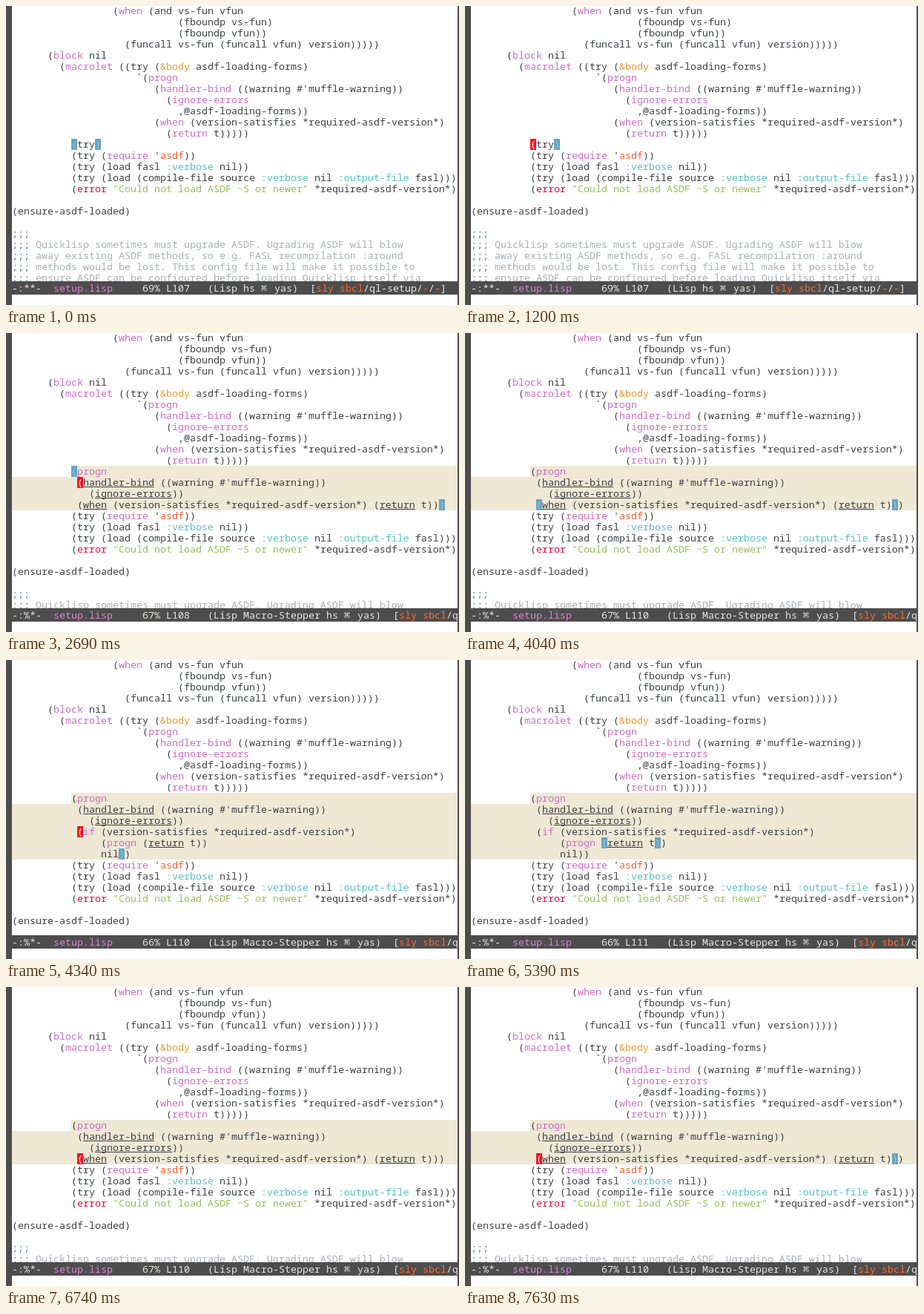
An HTML page for the animation above (8000 ms loop, 611 by 403 pixels).

```html
<!DOCTYPE html>
<html lang="en">
<head>
<meta charset="utf-8">
<title>Macro stepper</title>
<style>
html, body { margin: 0; width: 100%; height: 100%; overflow: hidden; background: #fff; }
#stage {
  position: relative; width: 611px; height: 403px; overflow: hidden; background: #fff;
  font: 13.333px/15px "Noto Sans Mono", "DejaVu Sans Mono", monospace;
  font-variant-ligatures: none; color: #3e4046;
}
#stage div, #stage span.at { position: absolute; white-space: pre; }
#buffer { left: 0; top: 0; width: 611px; height: 371px; overflow: hidden; }
#stage .edge { top: 0; height: 403px; background: #4d4d4d; }
#mode { left: 0; top: 371px; width: 611px; height: 18px; background: #4d4d4d; color: #e8e6e3; overflow: hidden; }
#echo { left: 8px; top: 389px; }
.sel { background: #eee8d5; }
.cell { width: 8px; height: 15px; }
.match { background: #62a7c6; color: #a9c0c6; }
.cursor { background: #f81024; color: #fff; }
.kw { color: #cb6dc4; }
.arg { color: #e59a2f; }
.key { color: #58bfbf; }
.sym { color: #fb5a2a; }
.err { color: #dc0d45; }
.str { color: #98bf5c; }
.rem { color: #abaeb5; }
.semi { color: #5a7898; }
.file { color: #dd82d2; }
.repl { color: #ff6b2c; }
u { text-underline-offset: 1px; text-decoration-thickness: 1px; text-decoration-skip-ink: none; }
</style>
</head>
<body>
<div id="stage">
  <div id="buffer"></div>
  <div id="echo"></div>
  <div id="mode"></div>
  <div class="edge" style="left:0;width:8px"></div>
  <div class="edge" style="left:609px;width:2px"></div>
</div>
<script>
const CW = 8, LH = 15, LOOP = 8000, FIRST = 12;
const el = id => document.getElementById(id);
const x = col => 8 + col * CW;
const y = row => row * LH - 1;

// Each line is [column, text].
const head = [
  [17, "(when (and vs-fun vfun"],
  [28, "(fboundp vs-fun)"],
  [28, "(fboundp vfun))"],
  [19, "(funcall vs-fun (funcall vfun) version)))))"],
  [6, "(block nil"],
  [8, "(macrolet ((try (&body asdf-loading-forms)"],
  [21, "`(progn"],
  [24, "(handler-bind ((warning #'muffle-warning))"],
  [26, "(ignore-errors"],
  [28, ",@asdf-loading-forms))"],
  [24, "(when (version-satisfies *required-asdf-version*)"],
  [26, "(return t)))))"]
];
const tail = [
  [10, "(try (require 'asdf))"],
  [10, "(try (load fasl :verbose nil))"],
  [10, "(try (load (compile-file source :verbose nil :output-file fasl)))"],
  [10, "(error \"Could not load ASDF ~S or newer\" *required-asdf-version*)"],
  [0, ""],
  [0, "(ensure-asdf-loaded)"],
  [0, ""],
  [0, ";;;"],
  [0, ";;; Quicklisp sometimes must upgrade ASDF. Ugrading ASDF will blow"],
  [0, ";;; away existing ASDF methods, so e.g. FASL recompilation :around"],
  [0, ";;; methods would be lost. This config file will make it possible to"],
  [0, ";;; ensure ASDF can be configured before loading Quicklisp itself via"]
];
const stepTop = [
  [10, "(progn"],
  [11, "(<u>handler-bind</u> ((warning #'muffle-warning))"],
  [13, "(<u>ignore-errors</u>))"]
];
const ifForm = body => [
  ...stepTop,
  [11, "(if (version-satisfies *required-asdf-version*)"],
  [15, `(progn ${body})`],
  [15, "nil))"]
];
const views = {
  plain: { pct: 69, lines: [[10, "(try)"]] },
  when: { pct: 67, lines: [...stepTop,
    [11, "(<u>when</u> (version-satisfies *required-asdf-version*) (<u>return</u> t)))"]] },
  if: { pct: 66, lines: ifForm("(<u>return</u> t)") },
  from: { pct: 66, lines: ifForm("(return-from nil t)") }
};

// Row and column of the opening and the closing paren of each form.
const forms = {
  try: [12, 10, 12, 14],
  progn: [12, 10, 15, 72],
  bind: [13, 11, 14, 28],
  ignore: [14, 13, 14, 27],
  when: [15, 11, 15, 71],
  if: [15, 11, 17, 18],
  return: [16, 22, 16, 31],
  from: [16, 22, 16, 40]
};

// [start ms, view, form at the cursor, cursor lit, form with marked parens]
const steps = [
  [0, "plain", "try", 0, "try"],
  [150, "plain", "try", 1, "try"],
  [600, "plain", "try", 0, "try"],
  [1200, "plain", "try", 1, "try"],
  [1650, "when", "progn", 1, ""],
  [1800, "when", "progn", 1, "progn"],
  [2240, "when", "progn", 0, "progn"],
  [2690, "when", "bind", 1, "progn"],
  [2840, "when", "bind", 1, "bind"],
  [2990, "when", "ignore", 1, "bind"],
  [3140, "when", "ignore", 1, "ignore"],
  [3440, "when", "when", 1, "ignore"],
  [3590, "when", "when", 1, "when"],
  [4040, "when", "when", 0, "when"],
  [4190, "if", "if", 1, ""],
  [4340, "if", "if", 1, "if"],
  [4790, "if", "if", 0, "if"],
  [4940, "if", "return", 1, "if"],
  [5090, "if", "return", 1, "return"],
  [5390, "if", "return", 0, "return"],
  [5540, "from", "from", 1, ""],
  [5690, "from", "from", 1, "from"],
  [5990, "from", "from", 0, "from"],
  [6290, "if", "return", 1, ""],
  [6440, "if", "return", 1, "return"],
  [6740, "when", "when", 1, ""],
  [6890, "when", "when", 1, "when"],
  [7190, "when", "when", 0, "when"],
  [7630, "when", "when", 1, "when"]
];

const span = (cls, text) => `<span class="${cls}">${text}</span>`;
const syntax = /(?<=\()(?<kw>when|if|block|macrolet|progn|handler-bind|ignore-errors|return-from|return|require)\b|(?<=\()(?<err>error)\b|(?<str>"[^"]*")|(?<key>:[a-z-]+)|(?<arg>&body)|(?<=\s')(?<sym>asdf)/g;

function paint(text) {
  if (text.startsWith(";;;")) return span("semi", ";;;") + span("rem", text.slice(3));
  return text.replace(syntax, (m, ...rest) => {
    const groups = rest[rest.length - 1];
    return span(Object.keys(groups).find(k => groups[k]), m);
  });
}

const line = ([col, text], row) =>
  `<div style="left:${x(col)}px;top:${y(row)}px">${paint(text)}</div>`;
const cell = (row, col, ch, cls) =>
  `<div class="cell ${cls}" style="left:${x(col)}px;top:${y(row)}px">${ch}</div>`;
const band = (left, row, rows) =>
  `<div class="sel" style="left:${left}px;top:${y(row)}px;width:${609 - left}px;height:${rows * LH}px"></div>`;

function modeLine(stepping, pct, num) {
  const at = (left, html) => `<span class="at" style="left:${left}px;top:2px">${html}</span>`;
  const dash = span("repl", "-");
  const minor = stepping ? "Lisp Macro-Stepper" : "Lisp";
  const where = stepping ? "/q" : `/ql-setup/${dash}/${dash}]`;
  return at(x(0), `-:${stepping ? "%" : "*"}*-`) + at(x(7), span("file", "setup.lisp")) +
    at(x(22), `${pct}% L${num}`) + at(x(33), `(${minor} hs ⌘`) +
    at(x(33) + (minor.length + 6) * CW + 2, " yas)") +
    at(x(33) + (minor.length + 13) * CW + 2, "[" + span("repl", "sly sbcl") + where);
}

function draw([time, name, at, lit, marked]) {
  const { pct, lines } = views[name];
  const stepping = name !== "plain";
  let html = stepping ? band(x(10), FIRST, 1) + band(8, FIRST + 1, lines.length - 1) : "";
  html += [...head, ...lines, ...tail].map(line).join("");
  if (marked) {
    const [r1, c1, r2, c2] = forms[marked];
    html += cell(r1, c1, "(", "match") + cell(r2, c2, ")", "match");
  }
  const [row, col] = forms[at];
  if (lit) html += cell(row, col, "(", "cursor");
  el("buffer").innerHTML = html;
  el("mode").innerHTML = modeLine(stepping, pct, 107 + row - FIRST);
  el("echo").textContent = time >= 1650 && time < 2690
    ? "Entering macro stepper mode. Use e to expand, c to collapse, q to exit." : "";
}

let shown;
function tick() {
  const t = performance.now() % LOOP;
  const step = steps.findLast(s => s[0] <= t);
  if (step !== shown) draw(shown = step);
  requestAnimationFrame(tick);
}
tick();
</script>
</body>
</html>
```
